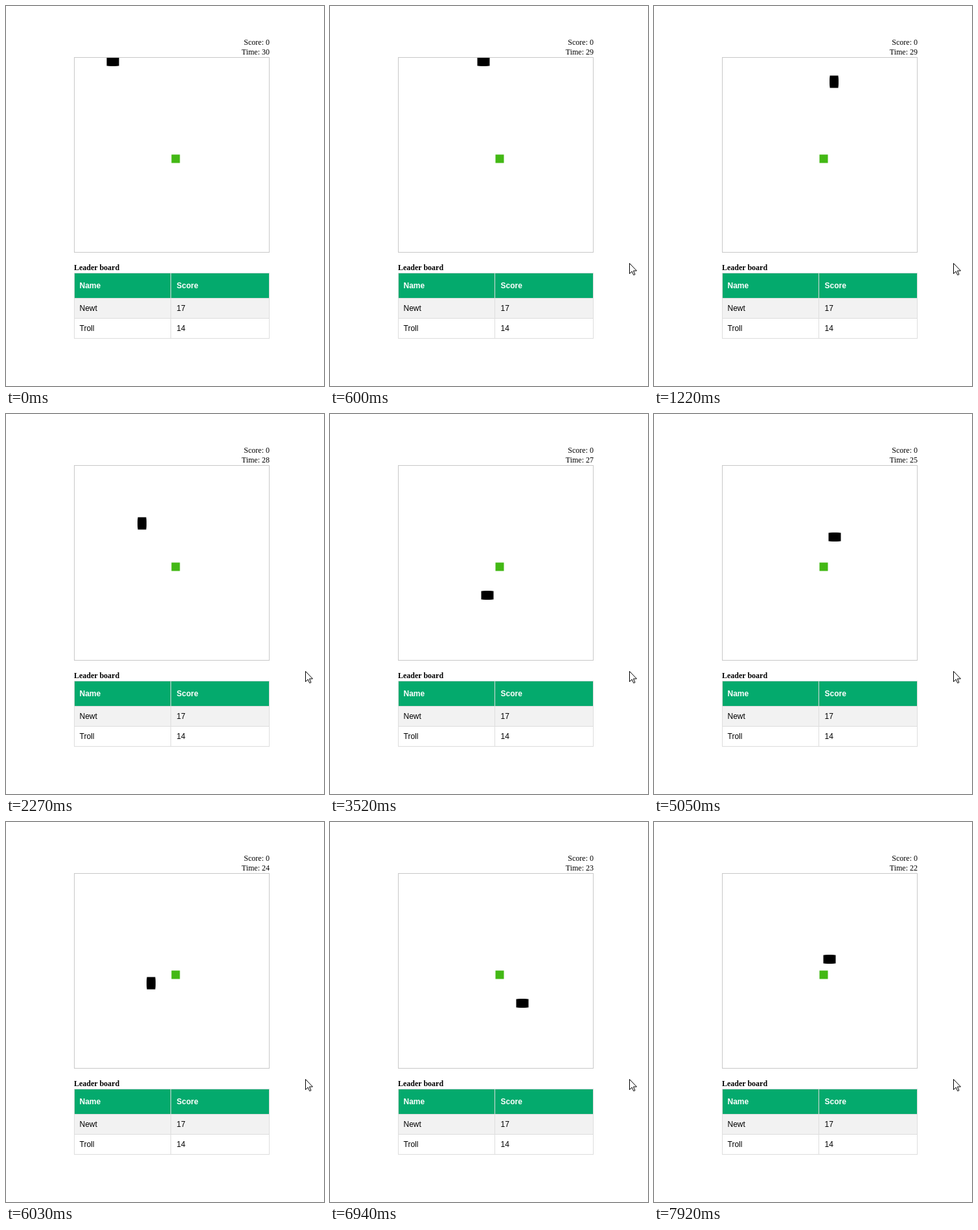
An HTML page that plays this animation: 491x587 px, repeating every 7.99 s.

```html
<!DOCTYPE html>
<html lang="en">
<head>
<meta charset="utf-8">
<title>Snake</title>
<style>
  html, body { margin: 0; width: 100%; height: 100%; overflow: hidden; background: #fff; }
  svg { display: block; }
  .serif { font: 12px "Liberation Serif", "Times New Roman", serif; }
  .sans { font: 12px "Liberation Sans", Arial, sans-serif; }
  .bold { font-weight: bold; }
  .end { text-anchor: end; }
</style>
</head>
<body>
<svg width="491" height="587" viewBox="0 0 491 587">
  <clipPath id="field"><rect x="106" y="80" width="300" height="300"/></clipPath>

  <g class="serif">
    <text class="end" x="407" y="60">Score: 0</text>
    <text class="end" x="407" y="75" id="time">Time: 30</text>
    <text class="bold" x="105" y="408">Leader board</text>
  </g>

  <rect x="105.5" y="79.5" width="301" height="301" fill="none" stroke="#c8c8c8"/>
  <g clip-path="url(#field)">
    <rect x="256" y="230" width="12" height="12" fill="#43b815" stroke="#43b815"/>
    <g id="snake" stroke="#000"></g>
  </g>

  <rect x="105" y="412" width="302" height="39" fill="#04aa6d"/>
  <rect x="105" y="451" width="302" height="31" fill="#f2f2f2"/>
  <path d="M105 412.5H407M105 451.5H407M105 482.5H407M105 513.5H407M105.5 412V514M254.5 412V514M406.5 412V514"
        fill="none" stroke="#ddd"/>
  <g class="sans">
    <g class="bold" fill="#fff">
      <text x="113.5" y="436">Name</text>
      <text x="263.5" y="436">Score</text>
    </g>
    <text x="113.5" y="471">Newt</text>
    <text x="263.5" y="471">17</text>
    <text x="113.5" y="502">Troll</text>
    <text x="263.5" y="502">14</text>
  </g>

  <path id="cursor" d="M.5 .5V16.5L4.2 13L6.8 18.6L9 17.6L6.5 12H11.5Z" fill="#fff" stroke="#000"/>
</svg>
<script>
const LOOP = 7990;
const SEGMENTS = 4, GAP = 2, STEP = 8;
const byId = id => document.getElementById(id);

// Corners of the snake's route, and the times that open each run of 12 ticks.
const route = [
  [156, 80], [272, 80], [272, 150], [204, 150], [204, 274], [298, 274],
  [298, 184], [218, 184], [218, 274], [300, 274], [300, 206], [262, 206]
];
const runs = [70, 880, 1710, 2550, 3380, 4220, 5050, 5890, 6730, 7570, 8410];

const parts = Array.from({ length: SEGMENTS }, () => {
  const r = document.createElementNS("http://www.w3.org/2000/svg", "rect");
  r.setAttribute("width", 12);
  r.setAttribute("height", 12);
  return byId("snake").appendChild(r);
});

function tickAt(t) {
  if (t < runs[0]) return 0;
  let i = 0;
  while (t >= runs[i + 1]) i++;
  const done = (t - runs[i]) / (runs[i + 1] - runs[i]);
  return 1 + 12 * i + Math.min(11, Math.floor(done * 12 + 0.2));
}

function pointAt(dist) {
  for (let i = 1; i < route.length; i++) {
    const [x0, y0] = route[i - 1], [x1, y1] = route[i];
    const len = Math.abs(x1 - x0) + Math.abs(y1 - y0);
    if (dist <= len) {
      const k = dist / len;
      return [x0 + (x1 - x0) * k, y0 + (y1 - y0) * k];
    }
    dist -= len;
  }
  return route[route.length - 1];
}

function drawCursor(n) {
  const k = Math.min(1, Math.max(0, (n - 3) / 5));
  const rest = (1 - k) ** 2;
  const cursor = byId("cursor");
  cursor.setAttribute("visibility", n < 3 ? "hidden" : "visible");
  cursor.setAttribute("transform",
    `translate(${462 - Math.round(14 * rest)} ${397 + Math.round(143 * rest)})`);
}

function draw(t) {
  const n = tickAt(t);
  const head = STEP * n + (n > 78 ? 2 : 0) + GAP * (SEGMENTS - 1);
  parts.forEach((part, i) => {
    const [x, y] = pointAt(head - GAP * i);
    part.setAttribute("x", x);
    part.setAttribute("y", y);
  });
  byId("time").textContent = "Time: " + (30 - Math.floor((n + 7) / 15));
  drawCursor(n);
}

const start = performance.now();
function loop() {
  draw((performance.now() - start) % LOOP);
  requestAnimationFrame(loop);
}
loop();
</script>
</body>
</html>
```
